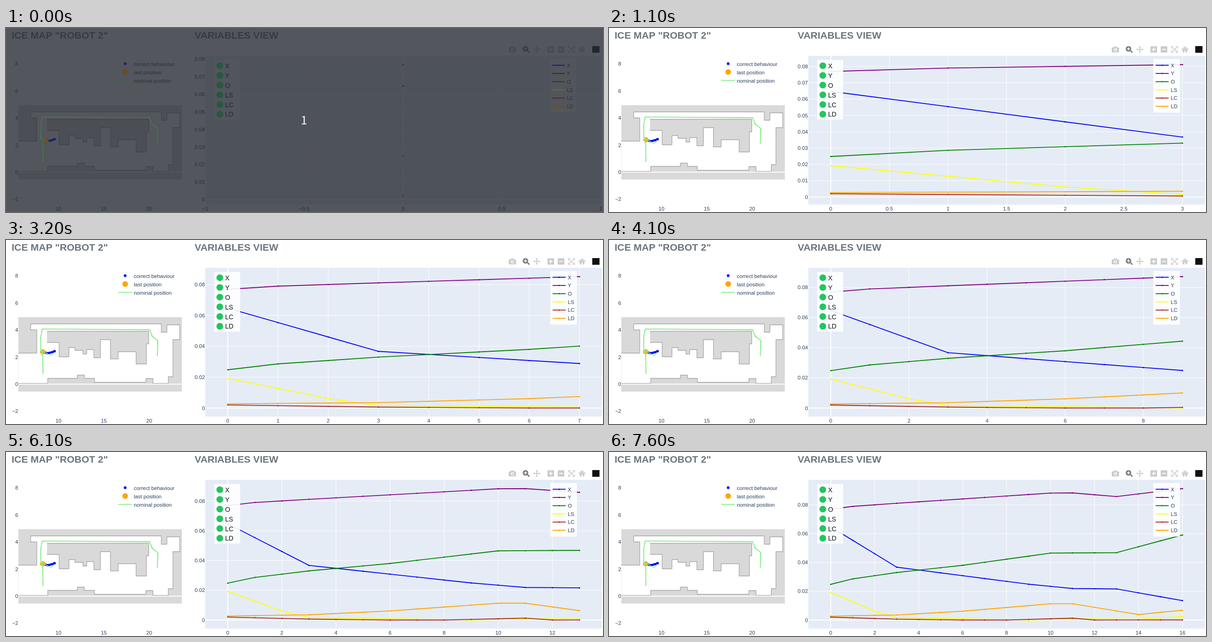
Write an HTML page with a canvas that moves like this. It is 1280 px wide and 397 px high and loops after 8 s.

```html
<!DOCTYPE html>
<html lang="en">
<head>
<meta charset="utf-8">
<title>Robot map and variables</title>
<style>
html, body { margin: 0; width: 100%; height: 100%; overflow: hidden; background: #fff; }
canvas { display: block; width: 1280px; height: 397px; }
</style>
</head>
<body>
<canvas id="stage" width="1280" height="397"></canvas>
<script>
const c = document.getElementById('stage').getContext('2d');
const LOOP = 8000;
const SANS = '"Liberation Sans", Arial, sans-serif';
const INK = '#2a3f5f', BLUE = '#0000ff', ORANGE = '#ffa500', GREEN = '#90ee90';
const PALE = '#c9cacc';

// Times at which the chart gains a sample
const UPDATES = [100, 500, 1000, 1600, 2100, 2700, 3200, 3600, 4100,
  4600, 5100, 5600, 6100, 6600, 7200, 7600];

// Bends of each curve: [sample, value in units of 0.0001]
const SERIES = [
  { name: 'X', color: BLUE, bends: [[0, 647], [3, 367], [9, 249], [11, 219], [13, 216], [16, 135]] },
  { name: 'Y', color: '#800080', bends: [[0, 769], [1, 790], [3, 811], [10, 882], [11, 883], [13, 858], [16, 913]] },
  { name: 'O', color: '#008000', bends: [[0, 248], [1, 286], [3, 330], [6, 380], [10, 465], [13, 468], [16, 591]] },
  { name: 'LS', color: '#ffff00', bends: [[0, 192], [2, 61], [3, 16], [9, 0], [11, 8], [14, 5], [16, 25]] },
  { name: 'LC', color: '#a52a2a', bends: [[0, 20], [3, 6], [6, 0], [8, 0], [11, 13], [12, 0], [16, 1]] },
  { name: 'LD', color: ORANGE, bends: [[0, 27], [3, 35], [6, 61], [10, 113], [11, 113], [14, 38], [16, 68]] }
];

// Walls run straight across and down in turn
const FLOOR = stairs(27, 244, 66, 194, 53, 181, 333, 199, 345, 183, 372.5, 215, 358,
  295, 348, 309.5, 315, 299, 300, 307, 189.5, 298.5, 168, 291.5, 153, 298.5, 89.5, 309.5, 27);
const BLOCK = stairs(88, 197, 306, 224, 301, 267.5, 279, 241, 240.5, 256.5, 224, 215,
  202.5, 254, 188.5, 236.5, 173, 246, 165, 238, 148, 232, 135, 252, 114, 221, 88);
const ROUTE = [324.5, 250, 326, 217, 313, 208, 308, 193, 78, 192, 74, 210, 74.5, 236, 79, 246, 79, 289];
const ROUTES = [
  ROUTE,
  ROUTE.map((v, i) => v + Math.sin(i * 2.1)),
  [74.5, 236, 88, 245, 97, 249, 104, 242]
];

function stairs(x, y, ...turns) {
  const p = [x, y];
  turns.forEach((v, i) => {
    if (i % 2) y = v; else x = v;
    p.push(x, y);
  });
  return p;
}

function sample(bends, i) {
  const n = Math.max(1, bends.findIndex(b => b[0] >= i));
  const [i0, v0] = bends[n - 1], [i1, v1] = bends[n];
  return (v0 + (v1 - v0) * (i - i0) / (i1 - i0)) / 1e4;
}

const samples = (s, k) => Array.from({ length: k + 1 }, (_, i) => sample(s.bends, i));

function text(s, x, y, size = 11.25, align = 'left', color = INK, weight = '') {
  c.font = `${weight} ${size}px ${SANS}`;
  c.textAlign = align;
  c.fillStyle = color;
  c.fillText(s, x, y);
}

function trace(p) {
  c.beginPath();
  for (let i = 0; i < p.length; i += 2) c.lineTo(p[i], p[i + 1]);
}

function line(p, color, width) {
  trace(p);
  c.strokeStyle = color;
  c.lineWidth = width;
  c.stroke();
}

function area(p, color) {
  trace(p);
  c.closePath();
  c.fillStyle = color;
  c.fill();
}

function rect(x, y, w, h, color) {
  c.fillStyle = color;
  c.fillRect(x, y, w, h);
}

function dot(x, y, r, color) {
  c.beginPath();
  c.arc(x, y, r, 0, 7);
  c.fillStyle = color;
  c.fill();
}

const label = v => String(+v.toFixed(4)).replace('-', '\u2212');

function niceStep(rough) {
  const base = 10 ** Math.floor(Math.log10(rough));
  return base * [2, 5, 10].find(m => m >= rough / base);
}

function drawRobot(k) {
  const left = (1 - k / 4) ** 2;
  const x = 78.5 + 7.5 * left, y = 241 + 2.5 * left;
  line([105, 238.5, 103, 241, 89, 244.5, x, y], BLUE, 4.6);
  dot(104, 240, 2.8, BLUE);
  dot(x, y, 5.6, ORANGE);
  ROUTES.forEach(r => line(r, GREEN, 1.7));
}

function drawMapKeys() {
  dot(255.5, 77, 2.9, BLUE);
  dot(255.5, 95, 6, ORANGE);
  line([241, 113, 270, 113], GREEN, 1.9);
}

function drawMap(k) {
  text('ICE MAP "ROBOT 2"', 12, 23.4, 21, 'left', '#6c757d', 'bold');
  for (let v = -2; v <= 8; v += 2) text(label(v), 26, 315 - v * 29.2, 11.25, 'right');
  for (let v = 10; v <= 20; v += 5) text(label(v), 112.5 + (v - 10) * 19.45, 394, 11.25, 'center');
  rect(26.5, 166.5, 350.5, 160.5, '#d9d9d9');
  for (const [shape, color] of [[FLOOR, '#fff'], [BLOCK, '#d9d9d9']]) {
    area(shape, color);
    line(shape, '#a6a6a6', 1.3);
  }
  rect(26.5, 310, 350.5, 1.9, '#fff');
  drawRobot(k);
  drawMapKeys();
  ['correct behaviour', 'last position', 'nominal position']
    .forEach((s, i) => text(s, 274, 81.5 + i * 18));
}

function drawTools() {
  // camera
  rect(1078, 42, 15.5, 10.5, PALE);
  rect(1082.5, 40, 6.5, 3, PALE);
  dot(1085.8, 47, 3.4, '#fff');
  dot(1085.8, 47, 1.9, PALE);
  // zoom
  line([1117, 48, 1122.5, 53], '#7b7d81', 2.6);
  dot(1113.8, 45, 6, '#7b7d81');
  rect(1110.5, 44.2, 6.6, 1.6, '#fff');
  rect(1113, 41.7, 1.6, 6.6, '#fff');
  // pan
  line([1131.5, 46.3, 1144.5, 46.3], PALE, 1.8);
  line([1138, 40, 1138, 53], PALE, 1.8);
  for (const [dx, dy] of [[1, 0], [-1, 0], [0, 1], [0, -1]]) {
    const x = 1138 + dx * 4.5, y = 46.3 + dy * 4.5;
    area([x + dx * 3, y + dy * 3, x + dy * 2.8, y + dx * 2.8, x - dy * 2.8, y - dx * 2.8], PALE);
  }
  // zoom in and out
  for (const x of [1161, 1183]) {
    rect(x, 39.5, 14, 13.5, PALE);
    rect(x + 3, 45.3, 8, 2, '#fff');
  }
  rect(1167, 42.3, 2, 8, '#fff');
  // autoscale
  for (const sx of [-1, 1]) for (const sy of [-1, 1]) {
    const x = 1212.5 + sx * 6.5, y = 46.3 + sy * 6.3;
    line([x - sx * 4, y, x, y, x, y - sy * 4], PALE, 1.7);
    line([1212.5, 46.3, x - sx * 2, y - sy * 2], PALE, 1.5);
  }
  // home
  line([1227.5, 47, 1235, 40.8, 1242.5, 47], PALE, 1.8);
  area([1230, 47, 1235, 42.8, 1240, 47, 1240, 52.5, 1230, 52.5], PALE);
  rect(1233.8, 48.5, 2.6, 4, '#fff');
  rect(1257, 39, 15.5, 14.5, '#111');
}

function drawCurves(k, x, y) {
  for (const s of SERIES) {
    const p = samples(s, k).flatMap((v, i) => [x(i), y(v)]);
    line(p, s.color, 1.9);
    for (let i = 0; i < p.length; i += 2) dot(p[i], p[i + 1], 1.5, s.color);
  }
}

function drawSwatches(shift) {
  SERIES.forEach((s, i) => {
    const y = 80.4 + i * 17.7;
    line([1172 - shift, y, 1200 - shift, y], s.color, 1.9);
    dot(1186 - shift, y, 1.5, s.color);
  });
}

function drawLamps() {
  SERIES.forEach((s, i) => dot(458.4, 81.4 + i * 20.93, 7.2, '#22c55e'));
}

function drawChart(k) {
  text('VARIABLES VIEW', 404.5, 23.4, 21, 'left', '#6c757d', 'bold');
  drawTools();
  const shift = k ? 0 : 2, right = 1277.5 - shift;
  const seen = SERIES.flatMap(s => samples(s, k));
  const lo = Math.min(...seen), hi = Math.max(...seen);
  const x = v => k ? 475.5 + v / k * 754 : 851.4 + v * 424;
  const y = v => 362.5 - (v - lo) / (hi - lo) * 283.5;
  const xMin = k ? -k * 0.0637 : -1, xMax = k ? k * 1.0637 : 1;
  const dx = niceStep((xMax - xMin) / 9.95);
  const dy = niceStep((hi - lo) * 321 / 283.5 / 9.15);

  rect(427.3, 60, right - 427.3, 321, '#e5ecf6');
  for (let i = Math.ceil(xMin / dx); i * dx <= xMax; i++) {
    const px = x(i * dx);
    line([px, 60, px, 381], '#fff', i ? 1 : 1.9);
    text(label(i * dx), px, 394, 11.25, 'center');
  }
  for (let i = 0; y(i * dy) > 60; i++) {
    const py = y(i * dy);
    line([427.3, py, right, py], '#fff', i ? 1 : 1.9);
    text(label(i * dy), 426.5, py + 4, 11.25, 'right');
  }
  drawCurves(k, x, y);

  rect(446.5, 69, 55.5, 128.5, 'rgba(255,255,255,.9)');
  drawLamps();
  rect(1167 - shift, 67, 57, 115.5, 'rgba(255,255,255,.9)');
  drawSwatches(shift);
  SERIES.forEach((s, i) => {
    text(s.name, 469.8, 86.7 + i * 20.95, 14.06, 'left', '#111');
    text(s.name, 1204.5 - shift, 84.5 + i * 17.7);
  });
}

function drawCountdown() {
  rect(0, 0, 1280, 397, 'rgba(40,44,52,.8)');
  // bright colours stay a little stronger under the veil
  c.globalAlpha = 0.12;
  drawLamps();
  drawRobot(0);
  drawMapKeys();
  drawSwatches(2);
  c.globalAlpha = 1;
  c.font = '24px "Noto Sans CJK JP", "Noto Sans CJK SC", sans-serif';
  c.textAlign = 'center';
  c.fillStyle = '#fff';
  c.fillText('1', 639, 208);
}

function render(t) {
  c.lineJoin = 'round';
  rect(0, 0, 1280, 397, '#fff');
  const k = UPDATES.filter(u => u <= t).length;
  drawMap(Math.min(4, Math.floor((t + 400) / 500)));
  drawChart(k);
  if (k === 0) drawCountdown();
}

const start = performance.now();
function tick() {
  render((performance.now() - start) % LOOP);
  requestAnimationFrame(tick);
}
tick();
</script>
</body>
</html>
```
